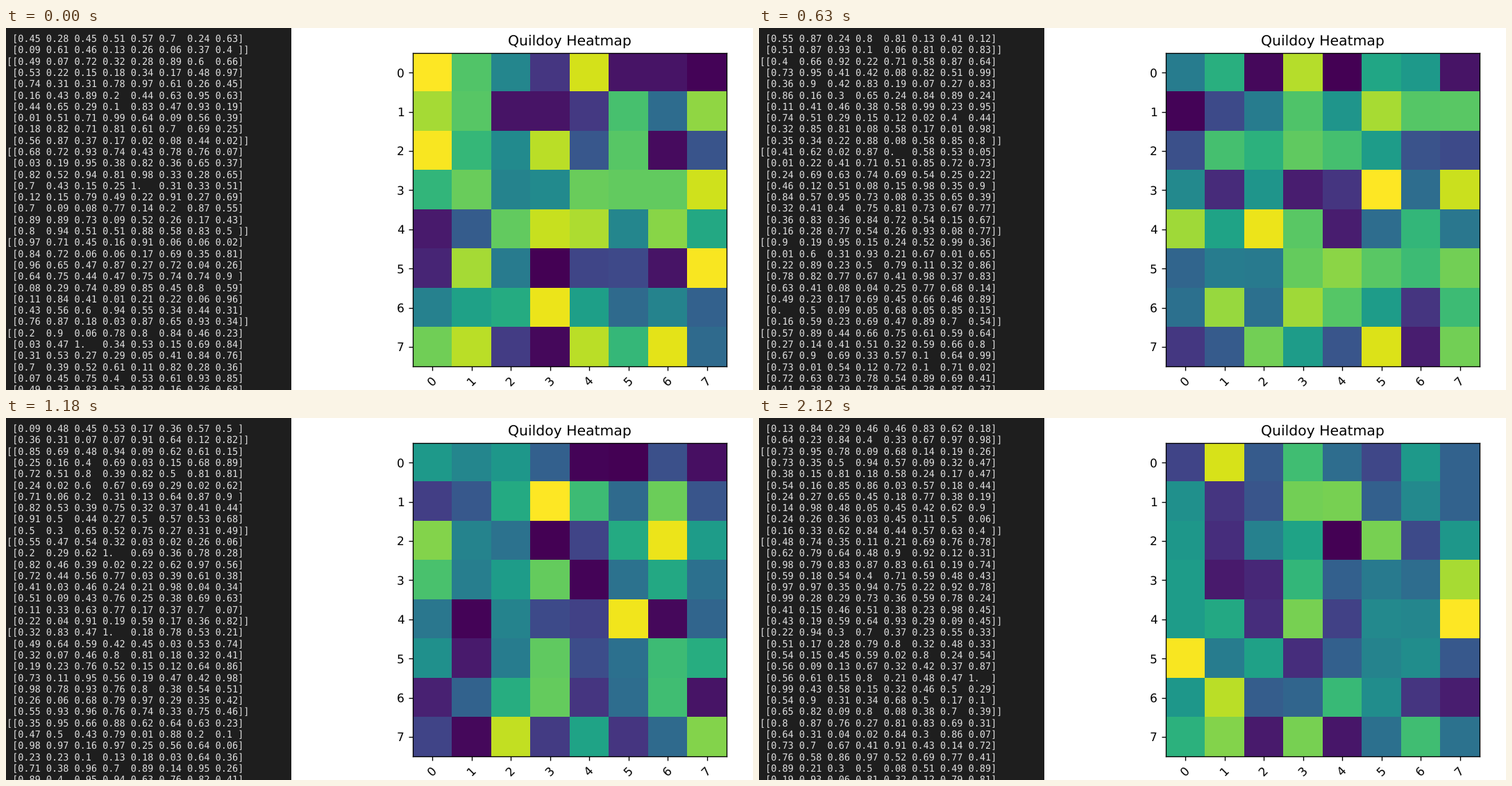
These frames come from a looping animation (1076x521 px, 2.2 s). A matplotlib script:

```python
import numpy as np
import matplotlib.pyplot as plt
from matplotlib.animation import FuncAnimation
from matplotlib.patches import Rectangle

W, H, DPI = 1076, 521, 128
LOOP, STEP = 2200, 20
ROWS, PITCH = 32, 16.29

# Key points: time (ms), update count, matrices scrolled off the console,
# and how far the heatmap runs ahead of the console's top.
TIME = [0, 410, 630, 950, 1420, 1800, 2120]
UPDATE = [0, 6, 9, 13, 19, 24, 27]
SCROLL = np.array([0, 5, 9, 12, 17, 20, 22])
LEAD = np.array([3, 3, 2, 3, 3, 2, 3])
EPS = 1e-6

plt.rcParams["font.family"] = "DejaVu Sans"
plt.rcParams["text.hinting"] = "none"


def pt(px):
    return px * 72 / DPI


def state(now):
    """Index of the console's top matrix and of the heatmap's matrix."""
    n = int(np.interp(now, TIME, UPDATE) + EPS)
    top = np.ceil(np.interp(n, UPDATE, SCROLL) - EPS)
    shown = np.floor(np.interp(n, UPDATE, SCROLL + LEAD) + EPS)
    return int(top), int(shown)


rng = np.random.default_rng(8)
data = np.round(rng.random((28, 8, 8)), 2)
lines = [line for m in data for line in str(m).split("\n")]

fig = plt.figure(figsize=(W / DPI, H / DPI), dpi=DPI, facecolor="white")
fig.add_artist(Rectangle((0, 0), 411 / W, 1, transform=fig.transFigure,
                         facecolor="#1e1e1e", edgecolor="none"))
console = [fig.text(1.2 / W, 1 - (20.3 + PITCH * i) / H, "", color="#e0e0e0",
                    family="DejaVu Sans Mono", size=pt(13.54), va="baseline")
           for i in range(ROWS)]

left, right, top, bottom = 585.8, 1037.8, 36, 487.2
ax = fig.add_axes([left / W, 1 - bottom / H, (right - left) / W, (bottom - top) / H])
image = ax.imshow(data[0], cmap="viridis", interpolation="nearest", aspect="auto")
ax.set_title("Quildoy Heatmap", size=pt(20.37), pad=pt(11.5))
ax.set_xticks(range(8))
ax.set_yticks(range(8))
ax.tick_params(labelsize=pt(16.98), length=pt(5.94), width=pt(1.36), pad=pt(5.94))
ax.tick_params(axis="x", labelrotation=45)
for spine in ax.spines.values():
    spine.set_linewidth(pt(1.36))


def draw(frame):
    scrolled, shown = state(frame * STEP + STEP / 2)
    first = 8 * scrolled + 6
    for label, line in zip(console, lines[first:first + ROWS]):
        label.set_text(line)
    image.set_data(data[shown])
    image.autoscale()
    return [image, *console]


anim = FuncAnimation(fig, draw, frames=LOOP // STEP, interval=STEP, repeat=True)
plt.show()
```
